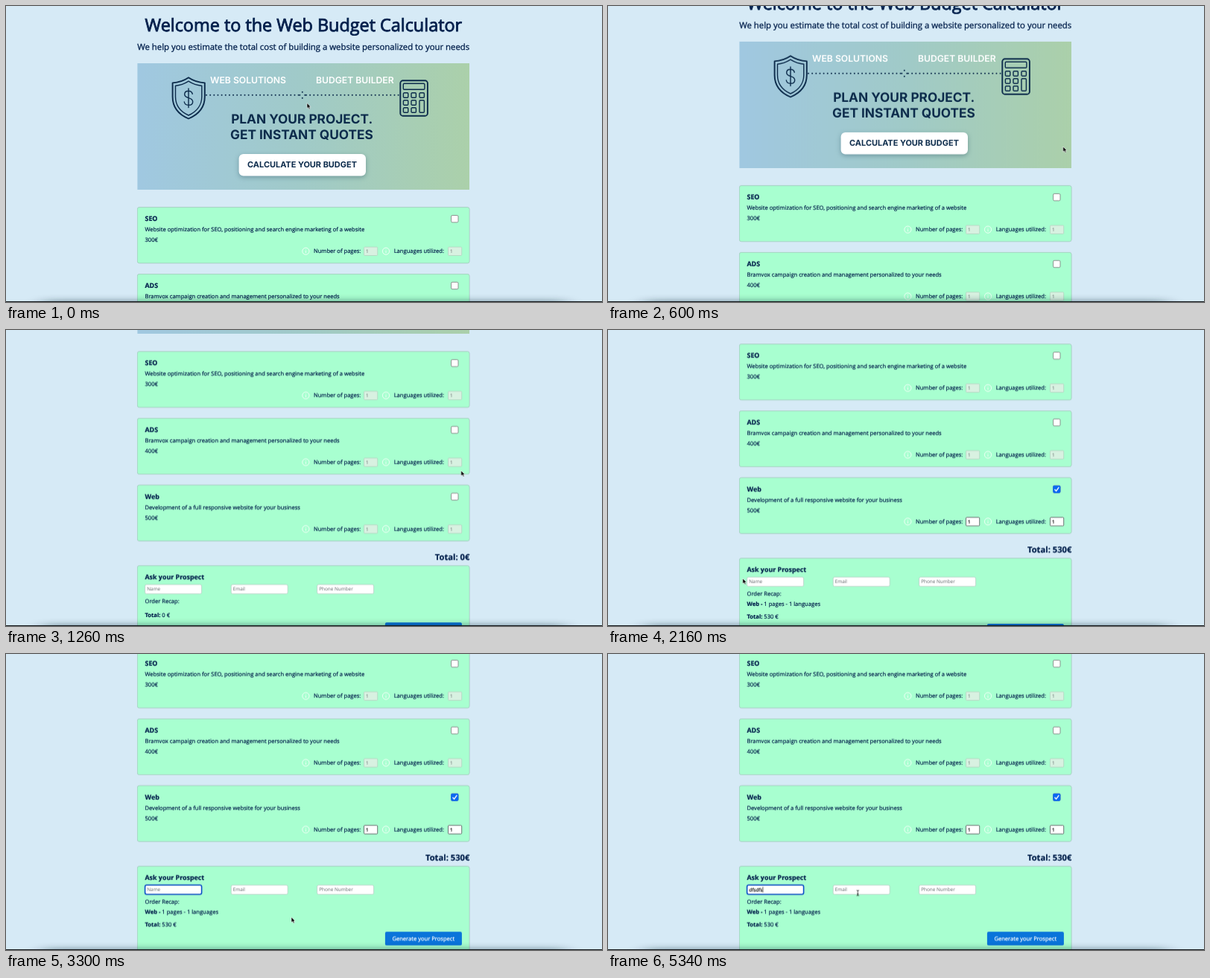
These frames come from a looping animation (800x398 px, 5.4 s). An HTML page:

```html
<!DOCTYPE html>
<html lang="en">
<head>
<meta charset="utf-8">
<title>Web Budget Calculator</title>
<style>
html, body { margin: 0; width: 100%; height: 100%; overflow: hidden; background: #d6eaf6; }
svg { display: block; width: 800px; height: 398px; }
text {
  font: 7.58px 'Open Sans', 'Noto Sans', sans-serif;
  fill: #03204c; stroke: #03204c; stroke-width: .2px;
  text-rendering: geometricPrecision; white-space: pre;
}
.title { font-size: 23.4px; stroke-width: .85px; }
.lead { font-size: 11.38px; stroke-width: .3px; }
.head { font-size: 8.9px; font-weight: 700; }
.sum { font-size: 11.2px; font-weight: 700; }
.b { font-weight: 700; }
.mid { text-anchor: middle; }
.end { text-anchor: end; }
.hint { font-size: 6.4px; fill: #62686b; stroke: none; }
.typed { font-size: 6.4px; fill: #111; stroke: #111; }
.label { fill: #fff; stroke: #fff; }
.banner text { font-family: Inter, Roboto, sans-serif; font-weight: 700; fill: #0c2b4b; stroke: none; }
.banner .tag { font-size: 12.2px; font-weight: 600; fill: #fff; }
.banner .big { font-size: 17.25px; }
.banner .cta { font-size: 10.95px; }
.line { fill: none; stroke: #0c2b4b; stroke-width: 1.9; stroke-linejoin: round; stroke-linecap: round; }
.thin { stroke-width: 1.4; }
.panel { fill: #a8ffd0; stroke: #a5cdbd; stroke-width: .6; filter: drop-shadow(0 .7px .6px rgba(0, 30, 40, .25)); }
.off { fill: #d8f1e1; stroke: #b3cdbd; stroke-width: .7; }
.on { fill: #fff; stroke: #4c5a58; stroke-width: .8; }
.field { fill: #fff; stroke: #b4c9c0; stroke-width: .7; }
.button { fill: #0a74da; }

.page, .cursor, .cover, .checked, .unchecked, .focus, .typing, .arrow, .beam {
  animation: 5.4s step-end infinite;
}
.page { animation-name: scroll; }
.cursor { animation-name: move; }
.cover { animation-name: type; }
.checked { animation-name: check; }
.unchecked { animation-name: uncheck; }
.focus { animation-name: focus; }
.typing { animation-name: start; }
.arrow { animation-name: arrow; }
.beam { animation-name: beam; }

/* Motion advances in 60 ms steps. */
@keyframes scroll {
  0% { transform: translateY(0); }
  6.6666% { transform: translateY(0); animation-timing-function: steps(1); }
  7.7777% { transform: translateY(-2.7px); animation-timing-function: steps(4); }
  12.2222% { transform: translateY(-38px); animation-timing-function: steps(5); }
  17.7777% { transform: translateY(-117.3px); animation-timing-function: steps(5); }
  23.3333% { transform: translateY(-241.7px); animation-timing-function: steps(3); }
  26.6666% { transform: translateY(-251.7px); }
  45.5555% { transform: translateY(-251.7px); animation-timing-function: steps(7); }
  53.3333%, 100% { transform: translateY(-273.3px); }
}
@keyframes move {
  0% { transform: translate(404px, 130.5px); }
  1.1111% { transform: translate(404px, 130.5px); animation-timing-function: steps(5); }
  6.6666% { transform: translate(610.7px, 189px); }
  24.4444% { transform: translate(610.7px, 189px); animation-timing-function: steps(5); }
  30% { transform: translate(602px, 212px); }
  32.2222% { transform: translate(602px, 212px); animation-timing-function: steps(7); }
  40% { transform: translate(180.8px, 334px); animation-timing-function: steps(2); }
  42.2222% { transform: translate(212px, 338px); }
  45.5555% { transform: translate(212px, 338px); animation-timing-function: steps(9); }
  55.5555% { transform: translate(383px, 353.7px); }
  66.6666% { transform: translate(383px, 353.7px); animation-timing-function: steps(5); }
  72.2222%, 100% { transform: translate(335.3px, 321.3px); }
}
@keyframes type {
  0% { transform: translateX(0); }
  75.5555% { transform: translateX(3.9px); }
  77.7777% { transform: translateX(6.1px); }
  80% { transform: translateX(9.1px); }
  83.3333% { transform: translateX(13.1px); }
  86.6666% { transform: translateX(15.2px); }
  90%, 100% { transform: translateX(18.3px); }
}
@keyframes check { 0% { opacity: 0; } 31.1111%, 100% { opacity: 1; } }
@keyframes uncheck { 0% { opacity: 1; } 31.1111%, 100% { opacity: 0; } }
@keyframes focus { 0% { opacity: 0; } 43.3333%, 100% { opacity: 1; } }
@keyframes start { 0% { opacity: 0; } 75.5555%, 100% { opacity: 1; } }
@keyframes arrow {
  0% { opacity: 1; } 41.1111% { opacity: 0; } 46.6666% { opacity: 1; } 71.1111%, 100% { opacity: 0; }
}
@keyframes beam {
  0% { opacity: 0; } 41.1111% { opacity: 1; } 46.6666% { opacity: 0; } 71.1111%, 100% { opacity: 1; }
}
</style>
</head>
<body>
<svg viewBox="0 0 800 398">
  <defs>
    <linearGradient id="sky">
      <stop offset="0" stop-color="#a0c8e1"/>
      <stop offset=".5" stop-color="#a0cac8"/>
      <stop offset="1" stop-color="#abd0aa"/>
    </linearGradient>
    <filter id="blur" x="-10%" y="-200%" width="120%" height="500%"><feGaussianBlur stdDeviation="12 5"/></filter>
    <g id="info">
      <circle r="4.6" fill="none" stroke="#f2fff8" stroke-width="1"/>
      <path d="M0-.6V2.4M0-2.3v.8" stroke="#f2fff8" stroke-width=".9"/>
    </g>
    <g id="off">
      <rect class="off" width="18.2" height="11.4" rx="1.2"/>
      <text class="hint" x="2.6" y="8.1">1</text>
    </g>
    <g id="on">
      <rect class="on" width="18.2" height="11.4" rx="1.2"/>
      <text class="typed" x="2.6" y="8.1">1</text>
    </g>
    <g id="card">
      <rect class="panel" x="176.4" width="445.6" height="75" rx="2.5"/>
      <rect x="597.6" y="10.8" width="9.4" height="9.4" rx="1.6" fill="#fff" stroke="#777" stroke-width=".8"/>
      <use href="#info" x="402.4" y="59"/>
      <text x="413" y="61.7">Number of pages:</text>
      <use href="#off" x="480.5" y="53.4"/>
      <use href="#info" x="510" y="59"/>
      <text x="520.7" y="61.7">Languages utilized:</text>
      <use href="#off" x="593.5" y="53.4"/>
    </g>
    <rect id="field" class="field" width="76" height="12.4" rx="2"/>
    <rect id="key" class="line thin" width="6.4" height="6.4" rx="1.2"/>
    <g id="send">
      <rect class="button" x="508.9" width="103" height="18.4" rx="2"/>
      <text class="label mid" x="560.3" y="11.8">Generate your Prospect</text>
    </g>
  </defs>

  <rect width="800" height="398" fill="#d6eaf6"/>

  <g class="page">
    <text class="title mid" x="399.3" y="34.3">Welcome to the Web Budget Calculator</text>
    <text class="lead mid" x="399.2" y="59.4">We help you estimate the total cost of building a website personalized to your needs</text>

    <g class="banner">
      <rect x="176.4" y="77" width="445.6" height="170" fill="url(#sky)"/>
      <path class="line" d="M245 96.3C238 101 231 103 223.6 103.4V122C223.6 136 232 146 245 151.5C258 146 266.8 136 266.8 122V103.4C259 103 252 101 245 96.3Z"/>
      <path class="line thin" d="M245 101.2C239 105 233.5 106.8 227.5 107.3V122C227.5 133 234 142 245 147C256 142 262.8 133 262.8 122V107.3C256.5 106.8 251 105 245 101.2Z"/>
      <path class="line thin" d="M250.3 118.3C249.5 115.3 247.5 114.3 245 114.3C241.5 114.3 239.7 116.3 239.7 118.8C239.7 125.5 250.7 121.7 250.7 128.7C250.7 131.5 248.5 133.3 245 133.3C242 133.3 239.8 131.8 239.3 129M245 111V136.5"/>
      <path d="M269 119.8H393M403 119.8H529" fill="none" stroke="#0c2b4b" stroke-width="2" stroke-linecap="round" stroke-dasharray="0 5.15"/>
      <g fill="#0c2b4b">
        <circle cx="394.3" cy="119.8" r="1"/><circle cx="401.3" cy="119.8" r="1"/>
        <circle cx="397.8" cy="115.8" r="1"/><circle cx="397.8" cy="123.8" r="1"/>
      </g>
      <rect class="line" x="529.3" y="100.3" width="36.6" height="47.4" rx="3.5"/>
      <rect class="line thin" x="533.3" y="104.3" width="28.6" height="8" rx="1.2"/>
      <use href="#key" x="533.4" y="116.8"/><use href="#key" x="544" y="116.8"/><use href="#key" x="555" y="116.8"/>
      <use href="#key" x="533.4" y="126.8"/><use href="#key" x="544" y="126.8"/>
      <use href="#key" x="533.4" y="136.8"/><use href="#key" x="544" y="136.8"/>
      <rect class="line thin" x="555" y="126.8" width="6.4" height="16.4" rx="1.2"/>
      <text class="tag mid" x="325" y="104.4">WEB SOLUTIONS</text>
      <text class="tag mid" x="468.3" y="104.4">BUDGET BUILDER</text>
      <text class="big mid" x="397.2" y="158.2">PLAN YOUR PROJECT.</text>
      <text class="big mid" x="396.9" y="178.8">GET INSTANT QUOTES</text>
      <rect x="312.6" y="199" width="170.4" height="29.4" rx="6" fill="#fff" style="filter:drop-shadow(0 2px 3px rgba(20,60,80,.35))"/>
      <text class="cta mid" x="397.5" y="217.4">CALCULATE YOUR BUDGET</text>
    </g>

    <g transform="translate(0 270.7)">
      <use href="#card"/>
      <text class="head" x="186.5" y="18.5">SEO</text>
      <text x="186.5" y="32.5">Website optimization for SEO, positioning and search engine marketing of a website</text>
      <text x="186.5" y="46.4">300€</text>
    </g>
    <g transform="translate(0 360.5)">
      <use href="#card"/>
      <text class="head" x="186.5" y="18.5">ADS</text>
      <text x="186.5" y="32.5">Bramvox campaign creation and management personalized to your needs</text>
      <text x="186.5" y="46.4">400€</text>
    </g>
    <g transform="translate(0 450.3)">
      <use href="#card"/>
      <text class="head" x="186.5" y="18.5">Web</text>
      <text x="186.5" y="32.5">Development of a full responsive website for your business</text>
      <text x="186.5" y="46.4">500€</text>
      <g class="checked">
        <rect x="597.2" y="10.4" width="10.2" height="10.2" rx="1.8" fill="#0a68f0"/>
        <path d="M599.5 15.7l2.1 2.2 3.7-5" fill="none" stroke="#fff" stroke-width="1.4"/>
        <use href="#on" x="480.5" y="53.4"/>
        <use href="#on" x="593.5" y="53.4"/>
      </g>
    </g>

    <text class="sum end unchecked" x="622.3" y="550.6">Total: 0€</text>
    <text class="sum end checked" x="622.3" y="550.6">Total: 530€</text>

    <g transform="translate(0 558.7)">
      <rect class="panel" x="176.4" width="445.6" height="117" rx="2.5"/>
      <text class="head" x="186.5" y="17.9">Ask your Prospect</text>
      <use href="#field" x="186.6" y="25.3"/>
      <use href="#field" x="302.2" y="25.3"/>
      <use href="#field" x="417.6" y="25.3"/>
      <text class="hint" x="189.3" y="33.8">Name</text>
      <text class="hint" x="304.7" y="33.8">Email</text>
      <text class="hint" x="420.2" y="33.8">Phone Number</text>
      <g class="typing">
        <rect x="188" y="27" width="40" height="9" fill="#fff"/>
        <text class="typed" x="189.3" y="33.8">dfsdfs</text>
        <g class="cover">
          <rect x="189.3" y="27" width="30" height="9" fill="#fff"/>
          <path d="M189.7 27.7v7.6" stroke="#111" stroke-width=".7"/>
        </g>
      </g>
      <rect class="focus" x="186.6" y="25.3" width="76" height="12.4" rx="2.2" fill="none" stroke="#0b50c8" stroke-width="1.6"/>
      <text x="186.5" y="50.3">Order Recap:</text>
      <g class="unchecked">
        <text x="186.5" y="69"><tspan class="b">Total:</tspan> 0 €</text>
        <use href="#send" y="76.2"/>
      </g>
      <g class="checked">
        <text x="186.5" y="64.4"><tspan class="b">Web - </tspan>1 pages - 1 languages</text>
        <text x="186.5" y="80.7"><tspan class="b">Total:</tspan> 530 €</text>
        <use href="#send" y="88"/>
      </g>
    </g>
  </g>

  <rect x="50" y="397" width="700" height="14" fill="#0a2630" opacity=".5" filter="url(#blur)"/>
  <rect y="397" width="800" height="1" fill="#14181b"/>

  <g class="cursor">
    <path class="arrow" d="M0 0V7.2L1.7 5.7 2.9 8.3 4.2 7.7 3.1 5.2H5.2Z" fill="#000" stroke="#fff" stroke-width=".6" stroke-linejoin="round"/>
    <path class="beam" d="M-1.5-3.6Q0-3.6 0-2.6Q0-3.6 1.5-3.6M0-2.6V2.8M-1.5 3.8Q0 3.8 0 2.8Q0 3.8 1.5 3.8M-1 1.5H1" fill="none" stroke="#111" stroke-width=".8"/>
  </g>
</svg>
</body>
</html>
```
